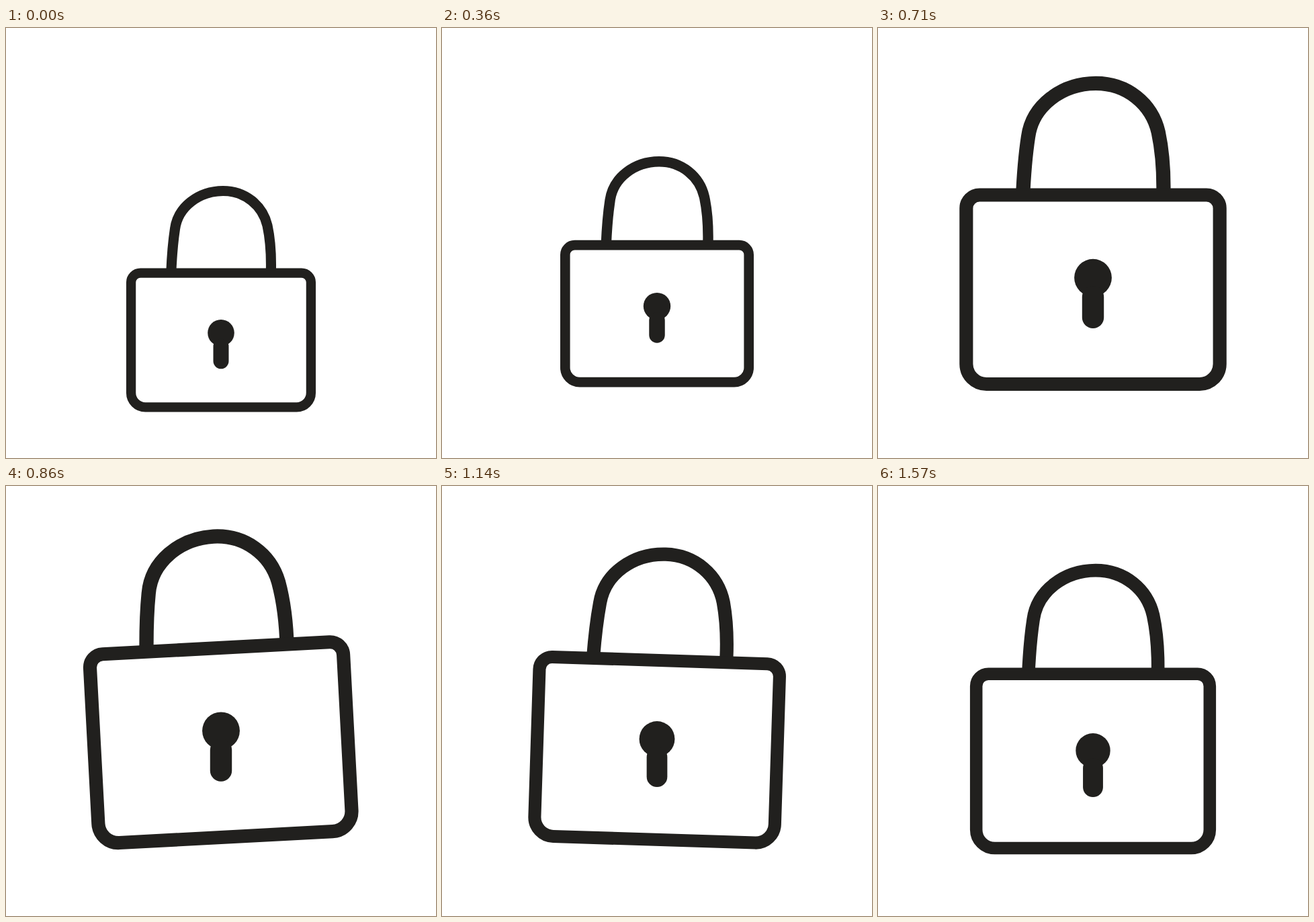
An HTML page for the animation above (2780 ms loop, 640 px wide and 640 px high).

```html
<!DOCTYPE html>
<html lang="en">
<head>
<meta charset="utf-8">
<title>Padlock</title>
<style>
  html, body { margin: 0; height: 100%; overflow: hidden; background: #fff; }
  svg { display: block; width: 100%; height: 100%; }
  path { fill: none; stroke: #21201e; }
  #hole { fill: #21201e; }
</style>
</head>
<body>
<svg viewBox="0 0 640 640">
  <g id="shackle"><path stroke-width="15.1" transform="translate(-320 -449.8)"
    d="M245.8 364C246.6 345 248.6 318 251.5 299C256 266 287 242.7 323 242.5C356 242.5 382 264 389 294C393.5 315 395 340 394.3 364"/></g>
  <g id="body"><path stroke-width="14.3"
    d="M-119.9-99.9H119.9a14 14 0 0 1 14 14V78.6a21.3 21.3 0 0 1-21.3 21.3H-112.6a21.3 21.3 0 0 1-21.3-21.3V-85.9a14 14 0 0 1 14-14Z"/></g>
  <g id="hole">
    <circle cy="-16.85" r="19.8"/>
    <rect x="-11.5" y="-8.15" width="23" height="44.8" rx="11.5"/>
  </g>
</svg>
<script>
const LOOP = 2780, FPS = 14, LAST = 22;

// Keys are [step, value] at 14 steps per second.
const rise = [[0, 0], [3, 24.9], [8, 61], [11.3, 84.5], [22, 55.1]];
const size = [[4.73, 1], [10.4, 1.44], [18, 1.298]];
const tilt = [[11.3, 0], [13, -7.4], [18, 8], [22, 0]];

function at(keys, k) {
  if (k <= keys[0][0]) return keys[0][1];
  for (let i = 1; i < keys.length; i++) {
    const [a, u] = keys[i - 1], [b, v] = keys[i];
    if (k <= b) return u + (v - u) * (k - a) / (b - a);
  }
  return keys[keys.length - 1][1];
}

function place(id, y, angle, scale) {
  document.getElementById(id).setAttribute('transform',
    `translate(320 ${y}) rotate(${angle}) scale(${scale})`);
}

function draw(now) {
  // Steps fall on whole hundredths of a second.
  const t = Math.floor(now % LOOP / 10) * 10;
  const k = Math.min(LAST, Math.floor((t + 5) * FPS / 1000));
  const y = 464.5 - at(rise, k), s = at(size, k), a = at(tilt, k);
  place('shackle', y - 14.7, a, s);
  place('body', y, a, s);
  place('hole', y + 6.15, 0, s);
}

const start = performance.now();
function tick() {
  draw(performance.now() - start);
  requestAnimationFrame(tick);
}
tick();
</script>
</body>
</html>
```
